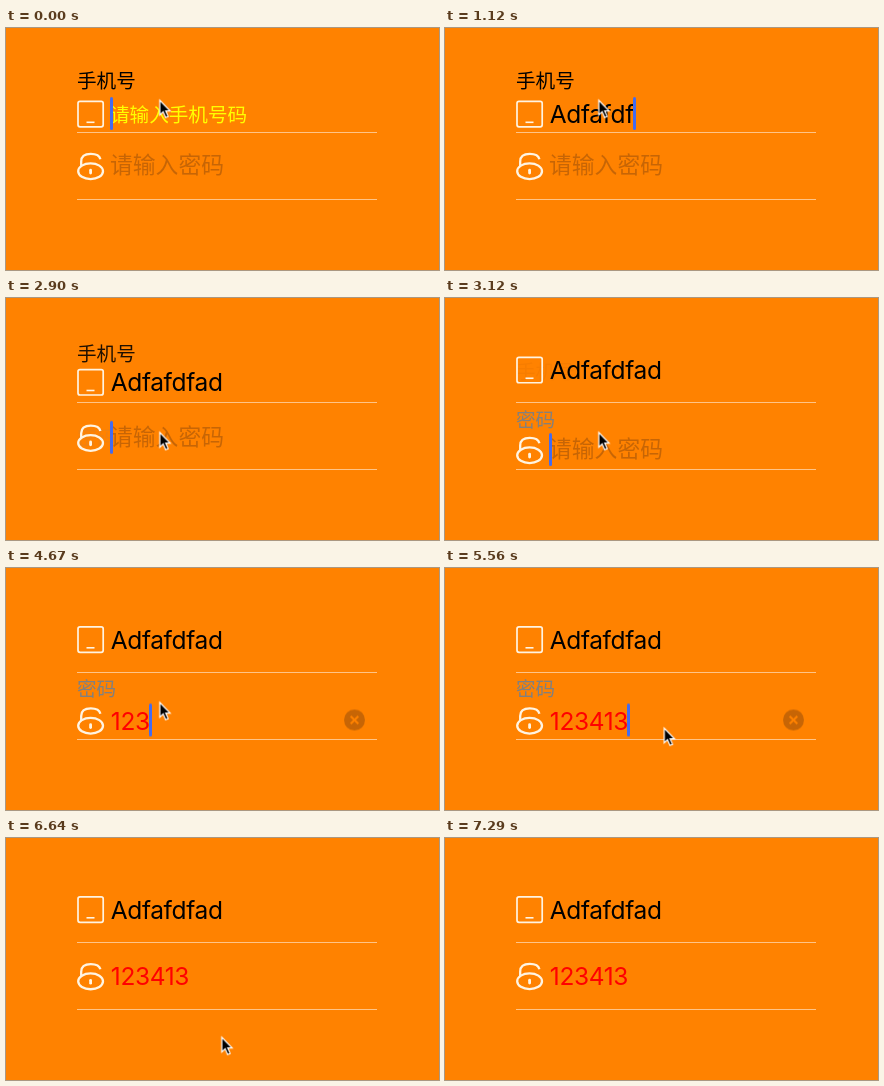
An HTML page for the animation above (8120 ms loop, 433 px wide and 242 px high).

```html
<!DOCTYPE html>
<html lang="zh-CN">
<head>
<meta charset="utf-8">
<title>登录表单</title>
<style>
  :root { --loop: 8120ms; --orange: #ff8200; }
  html, body { margin: 0; width: 100%; height: 100%; overflow: hidden; background: var(--orange); }
  main { position: relative; width: 433px; height: 242px; overflow: hidden; }
  main > *, .icon, .hint, .clear { position: absolute; }
  svg { overflow: visible; fill: none; }

  .line { left: 71px; width: 300px; height: 1px; background: rgba(255, 255, 255, .53); }
  .label, .hint {
    font-family: "Noto Sans CJK SC", "Noto Sans CJK", sans-serif;
    font-size: 19.6px; white-space: nowrap;
  }
  .label { left: 71px; height: 30px; line-height: 30px; }
  .row { left: 71px; width: 300px; height: 34px; padding-left: 33.8px; box-sizing: border-box;
    display: flex; align-items: center; }
  .icon { left: 0; top: 3px; stroke: #fff4e2; }
  .text { font: 24.5px/34px Inter, "Liberation Sans", sans-serif; letter-spacing: -.38px; white-space: pre; }
  .hint { left: 33px; line-height: 34px; }
  .text:not(:empty) ~ .hint { visibility: hidden; }
  .caret { position: relative; z-index: 1; width: 3px; height: 32.5px; margin-left: -.8px;
    border-radius: 1.5px; background: #426bf2; }
  .clear { left: 267px; top: 6.5px; }

  #phoneLabel { top: 36.8px; animation: phone-label var(--loop) linear infinite; }
  #phone { top: 68.5px; animation: phone-row var(--loop) linear infinite; }
  #phone .caret { animation: phone-caret var(--loop) linear infinite; }
  #phone .hint { color: #ff0; }
  #codeLabel { top: 104.5px; color: #808080; animation: code-label var(--loop) linear infinite; }
  #code { top: 120.5px; animation: code-row var(--loop) linear infinite; }
  #code .text { color: #f00; }
  #code .hint { top: -1.5px; font-size: 22.8px; color: rgba(0, 0, 25, .22); }
  #code .caret { animation: code-caret var(--loop) linear infinite; }
  .clear { animation: clear var(--loop) step-end infinite; }
  #pointer { left: 0; top: 0; animation: pointer var(--loop) linear infinite; }

  /* focus moves on at 2815 ms, is dropped at 6315 ms */
  @keyframes phone-label {
    0%, 34.667% { transform: none; opacity: 1; animation-timing-function: ease-in-out; }
    38.978%, 100% { transform: translateY(22px); opacity: 0; }
  }
  @keyframes phone-row {
    0%, 34.667% { transform: none; animation-timing-function: ease-in-out; }
    38.978%, 100% { transform: translateY(-14.5px); }
  }
  @keyframes code-label {
    0%, 34.667% { transform: translateY(22px); opacity: 0; animation-timing-function: ease-in-out; }
    38.978%, 77.771% { transform: none; opacity: 1; animation-timing-function: ease-in-out; }
    82.081%, 100% { transform: translateY(22px); opacity: 0; }
  }
  @keyframes code-row {
    0%, 34.667% { transform: none; animation-timing-function: ease-in-out; }
    38.978%, 77.771% { transform: translateY(14.5px); animation-timing-function: ease-in-out; }
    82.081%, 100% { transform: none; }
  }
  @keyframes phone-caret {
    0%, 25.985% { opacity: 1; }
    27.833%, 31.773% { opacity: 0; }
    32.882%, 33.98% { opacity: 1; }
    33.99%, 100% { opacity: 0; }
  }
  @keyframes code-caret {
    0%, 33.98% { opacity: 0; }
    33.99%, 41.379% { opacity: 1; }
    43.227%, 47.291% { opacity: 0; }
    48.276%, 75.616% { opacity: 1; }
    77.463%, 100% { opacity: 0; }
  }
  @keyframes clear {
    0%, 77.771%, 100% { opacity: 0; }
    50.493% { opacity: 1; }
  }
  @keyframes pointer {
    0%, 23.03% { transform: translate(153.8px, 72.3px); animation-timing-function: ease; }
    31.65%, 60.837% { transform: translate(153.8px, 134.5px); animation-timing-function: ease-in-out; }
    70.197% { transform: translate(224px, 162px); }
    71.429% { transform: translate(226px, 174px); animation-timing-function: ease-out; }
    73.768%, 87.808% { transform: translate(215.8px, 199.3px); }
    89.778%, 100% { transform: translate(340px, 258px); }
  }
</style>
</head>
<body>
<main>
  <div class="line" style="top:104px"></div>
  <div class="line" style="top:171px"></div>

  <div class="label" id="phoneLabel">手机号</div>
  <div class="row" id="phone">
    <svg class="icon" width="28" height="28">
      <rect x="1" y="1.4" width="25.2" height="25.4" rx="2" stroke-width="1.7"/>
      <path d="M9.5 22.3h8" stroke-width="1.6"/>
    </svg>
    <span class="text"></span><i class="caret"></i>
    <span class="hint">请输入手机号码</span>
  </div>

  <div class="label" id="codeLabel">密码</div>
  <div class="row" id="code">
    <svg class="icon" width="28" height="28" stroke-width="2.3">
      <ellipse cx="13.6" cy="19.2" rx="12.4" ry="7.9"/>
      <path d="M4.2 14.5V9.5C4.2 4.2 8 1.9 13.8 1.9C19 1.9 22.6 3.8 23.4 7.2"/>
      <path d="M13.6 18.2v2.8" stroke-width="2.8" stroke-linecap="round"/>
    </svg>
    <span class="text"></span><i class="caret"></i>
    <span class="hint">请输入密码</span>
    <svg class="clear" width="21" height="21">
      <circle cx="10.5" cy="10.5" r="10.5" fill="rgba(0,0,25,.22)"/>
      <path d="M6.7 6.7l7.6 7.6M14.3 6.7l-7.6 7.6" stroke="var(--orange)" stroke-width="2"/>
    </svg>
  </div>

  <svg id="pointer" width="12" height="19">
    <path d="M0 0V14.6L3.3 11.5L5.8 17.2L8.3 16.1L5.9 10.6H10.3Z" fill="#000" stroke="#fff" stroke-width="1.2"/>
  </svg>
</main>
<script>
  const LOOP = 8120;
  const fields = [
    { id: 'phone', value: 'Adfafdfad', times: [260, 500, 680, 760, 840, 920, 1120, 1420, 1510] },
    { id: 'code', value: '123413', times: [4100, 4220, 4670, 4910, 5250, 5540] }
  ];
  for (const field of fields) field.text = document.querySelector(`#${field.id} .text`);

  let start;
  function type(now) {
    start ??= now;
    const t = (now - start) % LOOP;
    for (const { text, value, times } of fields) {
      const typed = value.slice(0, times.filter(at => at <= t).length);
      if (text.textContent !== typed) text.textContent = typed;
    }
    requestAnimationFrame(type);
  }
  requestAnimationFrame(type);
</script>
</body>
</html>
```
